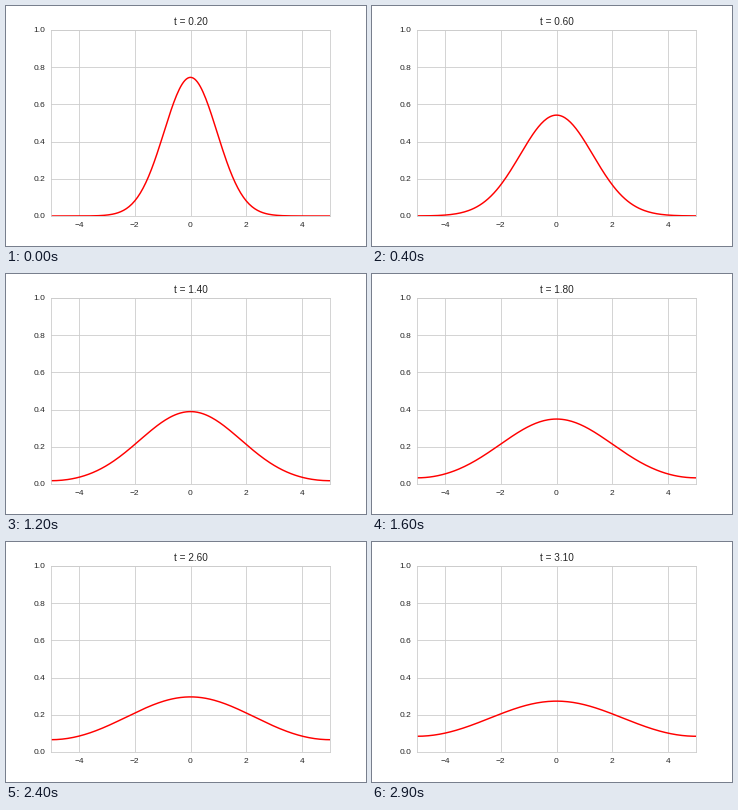
A matplotlib script for the animation above (3 s loop, 360 px wide and 240 px high).

```python
import numpy as np
import matplotlib.pyplot as plt
from matplotlib.animation import FuncAnimation

FRAMES = 30
HALF = 5
INK, GRID = "0.15", "0.8"

plt.rcParams.update({
    "font.family": "Liberation Sans",
    "font.size": 10,
    "axes.titlesize": 12,
    "axes.titlecolor": INK,
    "axes.edgecolor": GRID,
    "axes.linewidth": 1,
    "axes.axisbelow": True,
    "axes.grid": True,
    "grid.color": GRID,
    "grid.linewidth": 1,
    "xtick.color": INK,
    "ytick.color": INK,
    "xtick.major.size": 0,
    "ytick.major.size": 0,
    "xtick.major.pad": 7,
    "ytick.major.pad": 7,
})


def heat(x, t):
    """Spreading Gaussian with insulated walls, built from mirror images."""
    s = 1 + 4 * t
    images = 2 * HALF * np.arange(-2, 3)
    return np.exp(-(x[:, None] - images) ** 2 / s).sum(axis=1) / np.sqrt(s)


fig = plt.figure(figsize=(6, 4), dpi=60, facecolor="white")
ax = fig.add_axes([0.125, 0.125, 0.775, 0.775])
ax.set(xlim=(-HALF, HALF), ylim=(0, 1), xticks=range(-4, 5, 2))

x = np.linspace(-HALF, HALF, 201)
curve, = ax.plot(x, np.zeros_like(x), color="red", lw=1.75,
                 solid_capstyle="round")
title = ax.set_title("")


def update(i):
    t = 0.2 + 0.1 * i
    curve.set_ydata(heat(x, t))
    title.set_text(f"t = {t:.2f}")
    return curve, title


anim = FuncAnimation(fig, update, frames=FRAMES, interval=100,
                     init_func=lambda: update(0), repeat=True, repeat_delay=0)
plt.show()
```
